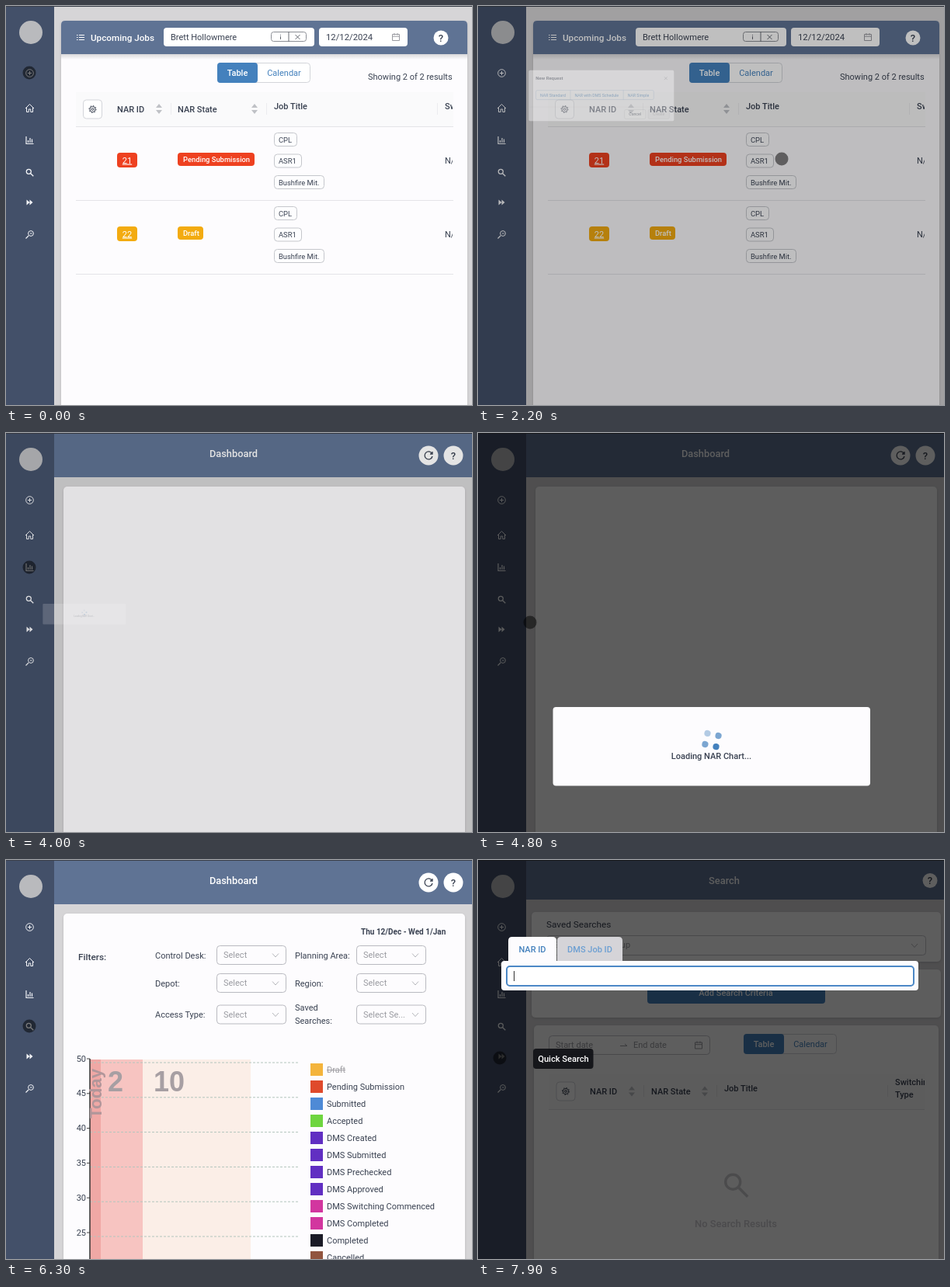
An HTML page that plays this animation: 600 by 514 pixels, repeating every 8 s.

```html
<!DOCTYPE html>
<html>
<head>
<meta charset="utf-8">
<style>
  html, body { margin: 0; height: 100%; overflow: hidden; background: #d6d5d7; }
  svg { display: block; width: 600px; height: 514px; font-family: Roboto, Inter, sans-serif; font-size: 11px; }
  text { white-space: pre; }
</style>
</head>
<body>
<svg id="stage" viewBox="0 0 600 514"></svg>
<script>
const INK = '#3a4252', BLUE = '#4481bd', NAVY = '#5f7394', LINE = '#d3d5da', GREY = '#9a9ba1';

// Drawing helpers, each returning SVG markup
const rect = (x, y, w, h, fill, r = 0, stroke = 'none', more = '') =>
  `<rect x="${x}" y="${y}" width="${w}" height="${h}" rx="${r}" fill="${fill}" stroke="${stroke}" ${more}/>`;
const box = (x, y, w, h, fill = '#fff', stroke = LINE, r = 4) =>
  rect(x + .5, y + .5, w - 1, h - 1, fill, r, stroke);
const text = (x, y, str, fill = INK, size = 11, weight = 400, more = '') =>
  `<text x="${x}" y="${y}" fill="${fill}" font-size="${size}" font-weight="${weight}" ${more}>${str}</text>`;
const mid = (x, y, str, fill, size, weight) => text(x, y, str, fill, size, weight, 'text-anchor="middle"');
const path = (d, stroke = INK, width = 1, fill = 'none', more = '') =>
  `<path d="${d}" fill="${fill}" stroke="${stroke}" stroke-width="${width}" ${more}/>`;
const circle = (x, y, r, fill, stroke = 'none', more = '') =>
  `<circle cx="${x}" cy="${y}" r="${r}" fill="${fill}" stroke="${stroke}" ${more}/>`;
const at = (x, y, body) => `<g transform="translate(${x} ${y})">${body}</g>`;
const group = (id, body, more = '') => `<g id="${id}" ${more}>${body}</g>`;
const hline = (x1, x2, y, color = '#e4e4e8') => path(`M${x1} ${y}H${x2}`, color);
const card = (x, y, w, h, r = 5) => rect(x, y, w, h, '#fdfcfe', r, 'none', 'filter="url(#soft)"');

const calendar = (x, y) => at(x, y, path('M-4.5 -3.5h9v8h-9zM-4.5 -.8h9M-2 -5v2.5M2 -5v2.5', GREY));
const help = (x, y, r) => circle(x, y, r, '#fff') + mid(x, y + 4.5, '?', INK, 13, 500);
const sorter = (x, y) => at(x, y, path('M-4 -1.5h8l-4 -5zM-4 1.5h8l-4 5z', 'none', 0, '#bfc1c6'));
const chevron = (x, y) => at(x, y, path('M-4 -2l4 4.5l4 -4.5', '#b5b6bb'));
const lens = (x, y, k, color, width) =>
  at(x, y, path(`M${k} ${k}L${4 * k} ${4 * k}`, color, width) + circle(-k, -k, 2.5 * k, 'none', color, `stroke-width="${width}"`));

const gear = (x, y) => box(x, y, 25, 25) + at(x + 12.5, y + 12.5,
  circle(0, 0, 3.6, 'none', INK) + circle(0, 0, 1.4, 'none', INK) +
  circle(0, 0, 4.6, 'none', INK, 'stroke-dasharray="1.4 2.2"'));

const toggle = (x, y) => box(x, y, 120, 26, '#fff') + rect(x, y, 52, 26, BLUE, 4) +
  mid(x + 26, y + 17, 'Table', '#fff', 11, 500) + mid(x + 86, y + 17, 'Calendar', BLUE);

function sidebar() {
  const w = '#f4f5f8';
  return rect(0, 0, 62, 514, '#435069') + circle(32, 34, 15, '#b9babd') +
    at(30.5, 86.5, circle(0, 0, 4.8, 'none', w) + path('M-2.5 0h5M0 -2.5v5', w)) +
    at(30.5, 131.5, path('M-5.5 .5L0 -5L5.5 .5M-4 -.5V5H-1.3V1.5H1.3V5H4V-.5', w)) +
    at(30.5, 173, path('M-4.5 -5V4.5H5M-2 3V0M.5 3V-3M3 3V-1.5', w, 1.2)) +
    lens(30.5, 214.5, 1.2, w, 1.3) +
    at(30.5, 253, path('M-4 -3.5L0 0L-4 3.5zM0 -3.5L4 0L0 3.5z', 'none', 0, w)) +
    at(30.5, 294.5, path('M-1.5 1.5L-5 5M.5 -1.5h2.5', w, 1.2) + circle(1.5, -1.5, 3.4, 'none', w));
}

function jobRow(y, id, state, color, width) {
  const tags = [['CPL', 30], ['ASR1', 36], ['Bushfire Mit.', 65]];
  return rect(143, y + 34, 26, 19, color, 4) +
    mid(156, y + 47.5, id, '#fff', 11, 400).replace('<text', '<text text-decoration="underline"') +
    rect(221, y + 34, width, 17, color, 4) + text(228, y + 46, state, '#fff', 9.4, 500) +
    tags.map(([name, w], i) => box(345, y + 8 + i * 27.5, w, 18, '#fdfdfe', '#c5c7cc') +
      text(351, y + 20.5 + i * 27.5, name, INK, 9.4)).join('') +
    text(565, y + 48, 'N/A', INK, 11, 400, 'clip-path="url(#cut)"') + hline(90, 576, y + 95.5);
}

function jobsPage() {
  return card(71, 19, 523, 520) + path('M71 62V24q0 -5 5 -5H589q5 0 5 5V62z', 'none', 0, NAVY) +
    rect(71, 62, 523, 7, 'url(#fade)') +
    path('M91 37.5h1.5M91 40.5h1.5M91 43.5h1.5M94 37.5h7M94 40.5h7M94 43.5h7', '#fff') +
    text(109, 44.5, 'Upcoming Jobs', '#fff', 11.7, 500) +
    rect(203, 28, 194, 24, '#fff', 4) + text(212, 44, 'Brett Hollowmere') +
    box(341, 33, 46, 13, '#fff', '#8b8e95', 3) +
    path('M364 33v13M353.5 37v1M353.5 39v4M372.5 37l6 6M378.5 37l-6 6', '#666a72') +
    rect(403, 28, 114, 24, '#fff', 4) + text(412, 44, '12/12/2024', INK, 11.3) + calendar(502, 40) +
    help(560, 41, 9.5) + toggle(272, 73) + text(466, 95, 'Showing 2 of 2 results') +
    rect(90, 111, 486, 44, '#fafafb') + gear(99, 120.5) +
    text(143, 137, 'NAR ID', INK, 11, 500) + sorter(197, 132.5) +
    text(221, 137, 'NAR State', INK, 11, 500) + sorter(320, 132.5) +
    path('M212.5 125v15M335.5 125v15M555.5 125v15', '#ececef') +
    text(345, 133, 'Job Title', INK, 11, 500) +
    text(565, 133, 'Switching', INK, 11, 500, 'clip-path="url(#cut)"') + hline(90, 576, 155.5) +
    jobRow(155, '21', 'Pending Submission', '#ee4120', 99) + jobRow(250, '22', 'Draft', '#f3ab10', 33);
}

function chart() {
  let out = rect(108, 257, 68, 257, '#f7c4c1') + rect(108, 257, 14, 257, '#f0a8a5') +
    rect(176, 257, 139, 257, '#fbeee7');
  for (let i = 0; i < 6; i++) {
    const y = 256 + i * 44.8;
    out += path(`M108 ${y + 5}H376`, '#b3c5bd', 1, 'none', 'stroke-dasharray="3 2"') +
      path(`M104 ${y}h4`, '#444') + text(103, y + 3.5, 50 - i * 5, INK, 11, 400, 'text-anchor="end"');
  }
  const big = 'font-family="Liberation Sans, sans-serif"';
  return out + path('M108 256V514', '#333', 1.5) +
    text(131, 298, '2', '#a79fa3', 36, 700, big) + text(190, 298, '10', '#a79fa3', 36, 700, big) +
    text(0, 0, 'Today', '#b1969a', 22.4, 700, big + ' transform="translate(123 333) rotate(-90)"');
}

function legend() {
  const violet = '#612fc2', pink = '#d2369f';
  return [['Draft', '#f4b43c'], ['Pending Submission', '#df4a2c'], ['Submitted', '#4e8ad6'],
    ['Accepted', '#6ed53f'], ['DMS Created', violet], ['DMS Submitted', violet],
    ['DMS Prechecked', violet], ['DMS Approved', violet], ['DMS Switching Commenced', pink],
    ['DMS Completed', pink], ['Completed', '#1b1b27'], ['Cancelled', '#91543e']
  ].map(([name, color], i) => rect(392, 262 + i * 22, 16, 16, color) +
    text(413, 274 + i * 22, name, i ? INK : '#a09fa4', 11, 400, i ? '' : 'text-decoration="line-through"')).join('');
}

function filters() {
  const select = (x, y, label) => box(x, y, 90, 25, '#fdfcfe', '#b9bac0') +
    text(x + 9, y + 16, label, GREY) + chevron(x + 76, y + 12.5);
  return text(457, 96, 'Thu 12/Dec - Wed 1/Jan', INK, 10, 700) + text(93, 129, 'Filters:', INK, 11.8, 500) +
    text(192, 127, 'Control Desk:') + text(192, 163, 'Depot:') + text(192, 203, 'Access Type:') +
    text(372, 127, 'Planning Area:') + text(372, 163, 'Region:') +
    text(372, 194, 'Saved') + text(372, 211, 'Searches:') +
    [110, 146, 186.5].map((y, i) => select(271, y, 'Select') +
      select(451, y, i < 2 ? 'Select' : 'Select Se...')).join('');
}

function dashPage() {
  return rect(62, 0, 538, 57, NAVY) + mid(293, 31, 'Dashboard', '#fff', 12.8, 500) +
    circle(544, 29, 12.5, '#fff') + path('M548.5 26.5A5 5 0 1 0 549 30M549 24v3h-3', INK, 1.3) +
    help(576, 29, 12.5) + card(74, 69, 517, 470) + group('report', filters() + chart() + legend());
}

function searchPage() {
  return rect(62, 0, 538, 51, NAVY) + mid(317, 31, 'Search', '#fff', 12.9, 500) + help(582, 26.5, 9.5) +
    card(69, 67, 527, 64) + text(88, 87, 'Saved Searches', INK, 11.8) +
    box(88, 97, 489, 26, '#fff', '#c3c5ca') + text(97, 113, 'Select Search Group', GREY) + chevron(562, 110) +
    card(69, 141, 527, 62) + rect(218, 159, 229, 26, BLUE, 4) +
    mid(332, 175, 'Add Search Criteria', '#fff', 11, 500) +
    card(72, 213, 521, 330) + box(91, 226, 208, 25, '#fff', '#c3c5ca') +
    text(100, 242, 'Start date', GREY) + path('M183 239.5h9l-3 -2.5', GREY) +
    text(200, 242, 'End date', GREY) + calendar(284, 238.5) + toggle(342, 224) +
    rect(91, 276, 484, 45, '#fafafb') + gear(100.5, 285.5) +
    text(144, 302, 'NAR ID', INK, 11, 500) + sorter(198, 298) +
    text(223, 302, 'NAR State', INK, 11, 500) + sorter(292, 298) +
    path('M213.5 290v15M307.5 290v15M527.5 290v15', '#e8e8eb') +
    text(317, 298, 'Job Title', INK, 11, 500) +
    text(537, 290, 'Switching', INK, 11, 500, 'clip-path="url(#cut)"') +
    text(537, 306, 'Type', INK, 11, 500) + hline(91, 575, 321.5) +
    lens(332, 418.5, 3.8, '#cdccd0', 3.4) + mid(332, 473, 'No Search Results', '#cbcacf', 12.9, 500);
}

function requestModal() {
  return rect(104, 79, 392, 137.5, '#fdfcfe', 4) + text(123, 105, 'New Request', INK, 12.5, 500) +
    path('M470 97l8 8M478 97l-8 8', GREY, 1.2) +
    box(123, 133, 319, 26, '#fff', '#9fbcdb') + path('M216.5 133v26M359.5 133v26', '#9fbcdb') +
    text(135, 150, 'NAR Standard', BLUE) + text(228, 150, 'NAR with DMS Schedule', BLUE) +
    text(371, 150, 'NAR Simple', BLUE) + hline(104, 496, 178.5) +
    box(362, 185, 58, 26, '#fff', '#c5c7cc') + mid(391, 201, 'Cancel') +
    box(426, 185, 58, 26, '#f3f3f5', '#d0d0d4') + mid(455, 201, 'Create', '#b4b4b9');
}

function quickModal() {
  return path('M39 132V104q0 -5 5 -5H96q5 0 5 5V132z', 'none', 0, '#fdfcfe') +
    path('M102 132V104q0 -5 5 -5H181q5 0 5 5V132z', 'none', 0, '#d5d4d8') +
    mid(70, 119, 'NAR ID', BLUE, 11, 500) + mid(144, 119, 'DMS Job ID', '#6c9fd2', 11, 500) +
    rect(30, 130, 537, 38, '#fdfcfe', 4) + rect(37, 137, 524, 25, '#fff', 4, '#4c88c6', 'stroke-width="2"') +
    path('M46.5 143v13', '#333');
}

const loadModal = () => rect(96.5, 353, 408.5, 101.5, '#fdfcfe', 4) +
  group('dots', [[-7.2, -7.2], [7.2, -7.2], [7.2, 7.2], [-7.2, 7.2]].map(([x, y]) => circle(x, y, 4.1, BLUE)).join('')) +
  mid(300.5, 419.5, 'Loading NAR Chart...', INK, 11, 500);

const tip = (y, label) => rect(71, y, 77.5, 26, '#111216', 4, 'none', 'opacity=".93"') +
  mid(110, y + 17, label, '#fff', 11.1, 500);

const stage = document.getElementById('stage');
stage.innerHTML = `<defs>
    <clipPath id="cut"><rect width="575" height="514"/></clipPath>
    <filter id="soft" x="-5%" y="-10%" width="110%" height="125%"><feDropShadow dx="0" dy="1" stdDeviation="1.5" flood-opacity=".15"/></filter>
    <linearGradient id="fade" x2="0" y2="1"><stop stop-opacity=".14"/><stop offset="1" stop-opacity="0"/></linearGradient>
  </defs>` + rect(0, 0, 600, 514, '#d6d5d7') +
  group('jobs', jobsPage()) + group('dash', dashPage()) + group('search', searchPage()) +
  sidebar() + rect(0, 0, 600, 1, '#3b404a') +
  group('shade', rect(0, 0, 600, 514, '#000')) +
  group('request', requestModal()) + group('loading', loadModal()) + group('quick', quickModal()) +
  group('tipNew', tip(76, 'New Request')) + group('tipQuick', tip(243, 'Quick Search')) +
  group('cursor', circle(0, 0, 8.5, 'rgba(0,0,0,.5)'));

const el = id => document.getElementById(id);
const clamp = v => Math.max(0, Math.min(1, v));
const ease = v => v * v * (3 - 2 * v);
const ramp = (t, a, b) => clamp((t - a) / (b - a));
const pulse = (t, a, b, c, d) => ramp(t, a, b) * (1 - ramp(t, c, d));

// Time, x, y
const route = [[0, 30, 86], [1150, 30, 86], [1900, 391, 197], [2300, 391, 197], [3300, 22, 132],
  [3450, 22, 132], [3750, 30, 173], [4200, 30, 173], [4800, 67, 244], [5000, 67, 244], [5600, 123, 204],
  [6300, 30, 214], [6750, 30, 214], [7150, 30, 249], [7400, 30, 249], [7800, 28, 255], [8000, 28, 255]];

function show(id, v) {
  el(id).style.display = v > 0 ? '' : 'none';
  el(id).setAttribute('opacity', v);
}

function zoom(id, v, x, y) {
  const k = .2 + .8 * ease(v);
  show(id, v);
  el(id).setAttribute('transform', `translate(${x} ${y}) scale(${k}) translate(${-x} ${-y})`);
}

function draw(t) {
  show('jobs', +(t < 3900));
  show('dash', +(t >= 3900 && t < 6700));
  show('search', +(t >= 6700));
  show('report', +(t >= 5450));

  const request = pulse(t, 550, 850, 2050, 2300);
  const loading = pulse(t, 3950, 4250, 5440, 5560);
  const quick = ramp(t, 7450, 7750);
  show('shade', .63 * Math.max(request, pulse(t, 3950, 4250, 5450, 5670), quick));
  zoom('request', request, 30, 86);
  zoom('loading', loading, 30, 173);
  zoom('quick', quick, 30, 253);
  show('tipNew', pulse(t, 350, 500, 1250, 1400));
  show('tipQuick', ramp(t, 7400, 7550));

  const turn = (t - 4800) / 1200;
  el('dots').setAttribute('transform', `translate(301 395.5) rotate(${12 + turn * 360})`);
  [...el('dots').children].forEach((dot, i) =>
    dot.setAttribute('opacity', .7 - .3 * Math.cos(turn * Math.PI - i * Math.PI / 2)));

  const i = route.findIndex(p => p[0] > t);
  const [a, b] = [route[i - 1], route[i]];
  const u = ease(ramp(t, a[0], b[0]));
  el('cursor').setAttribute('transform', `translate(${a[1] + (b[1] - a[1]) * u} ${a[2] + (b[2] - a[2]) * u})`);
}

const start = performance.now();
function tick() {
  draw((performance.now() - start) % 8000);
  requestAnimationFrame(tick);
}
tick();
</script>
</body>
</html>
```
